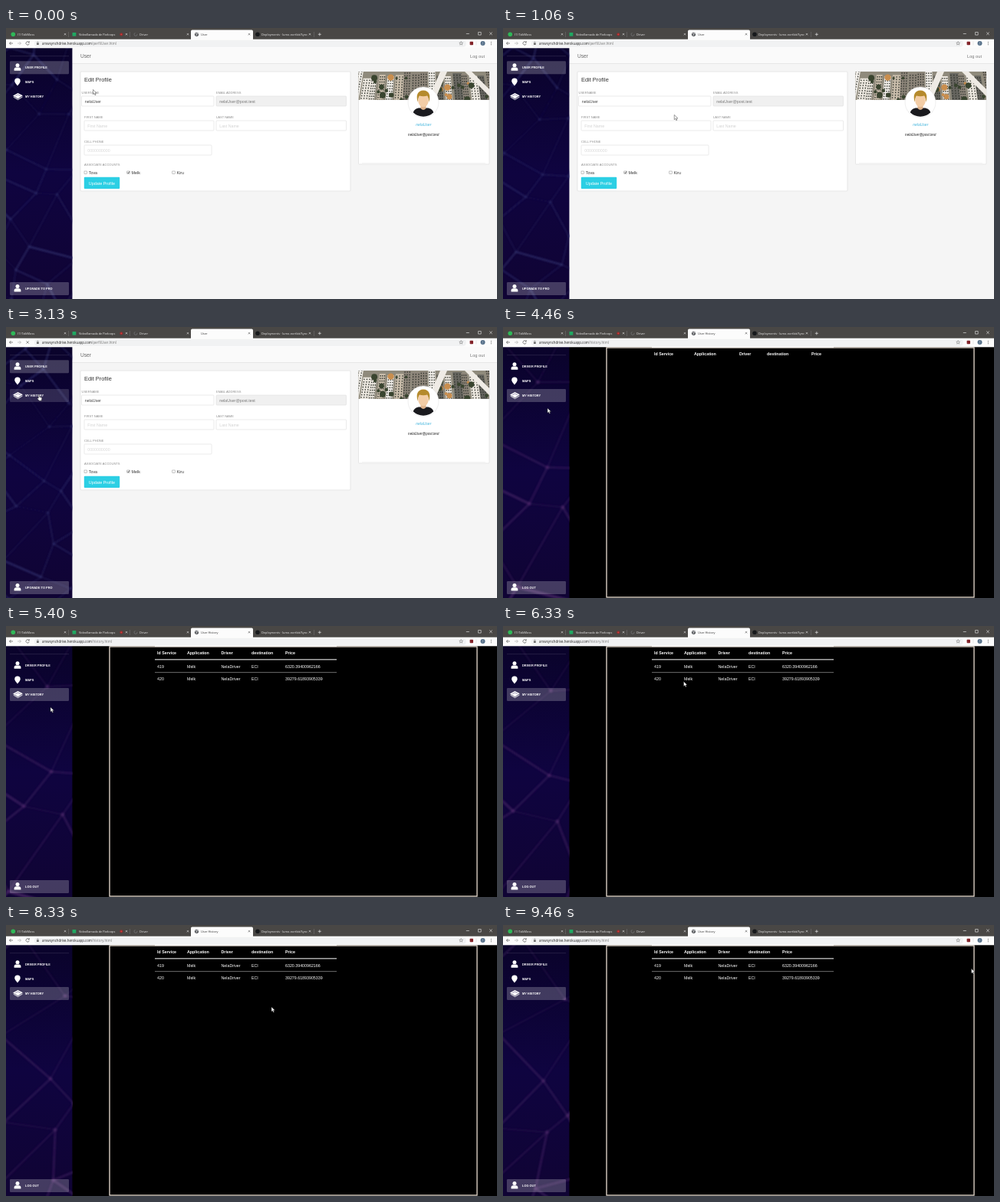
Animation of 640x354 px, one loop 9520 ms. Source, as an HTML page:

```html
<!DOCTYPE html>
<html lang="en">
<head>
<meta charset="utf-8">
<title>User</title>
<style>
html, body { margin: 0; width: 100%; height: 100%; overflow: hidden; background: #000; }
svg { display: block; width: 100%; height: 100%; }
text { font-family: "Liberation Sans", Arial, sans-serif; white-space: pre; }
.ui text { font-family: "Open Sans", "Noto Sans", sans-serif; }
.b { font-weight: bold; }
.i { font-style: italic; }
</style>
</head>
<body>
<svg id="stage" viewBox="0 0 640 354"></svg>
<script>
const LOOP = 9520, CLICK = 3060, LOAD = 4200, ROWS = 5330;
const SIDE = 86.4, TOP = 26;
const stage = document.getElementById('stage');

// Markup helpers
const text = (x, y, s, size, fill, cls = '', more = '') =>
  `<text x="${x}" y="${y}" font-size="${size}" fill="${fill}" class="${cls}" ${more}>${s}</text>`;
const rect = (x, y, w, h, fill, more = '') =>
  `<rect x="${x}" y="${y}" width="${w}" height="${h}" fill="${fill}" ${more}/>`;
const disc = (x, y, r, fill, more = '') => `<circle cx="${x}" cy="${y}" r="${r}" fill="${fill}" ${more}/>`;
const path = (d, stroke, w = 0.7, fill = 'none', more = '') =>
  `<path d="${d}" stroke="${stroke}" stroke-width="${w}" fill="${fill}" ${more}/>`;
const shape = (d, fill) => `<path d="${d}" fill="${fill}"/>`;
const group = (id, body, more = '') => `<g id="${id}" ${more}>${body}</g>`;
const cross = (x, y, r, c, w) => path(`M${x - r} ${y - r}l${2 * r} ${2 * r}m0 ${-2 * r}l${-2 * r} ${2 * r}`, c, w);
const range = n => [...Array(n).keys()];

function rng(seed) {
  return () => (seed = (seed * 16807) % 2147483647) / 2147483647;
}

function browser() {
  const tab = (x, s, fill = '#ececec', id = '') => text(x, 9.9, s, 3.9, fill, '', `id="${id}"`);
  const closes = [77, 157, 237, 396].map(x => cross(x, 8.2, 1.2, '#e0e0e0', 0.6)).join('');
  const seps = [81, 161.5, 401].map(x => rect(x, 5, 0.5, 7, '#777')).join('');
  return rect(0, 0, 640, 15, '#494745') + seps + closes +
    shape('M241 15V4.4q0-1.8 1.8-1.8h77.4q1.8 0 1.8 1.8V15z', '#fcfcfc') +
    cross(317, 8.2, 1.2, '#555', 0.6) +
    disc(9.3, 8.3, 2.8, '#2fb858') + tab(15, '(1) TalkMoss') +
    rect(86.5, 6, 4.8, 4.6, '#20a862') + tab(95, 'Videollamada de Parloops') +
    disc(150.3, 8.3, 2.1, '#8e2f2f') + disc(150.3, 8.3, 0.9, '#d94141') +
    disc(169, 8.3, 2, 'none', 'stroke="#77797c" stroke-width=".7" stroke-dasharray="8 3"') + tab(174, 'Driver') +
    group('globe', disc(248.5, 8.3, 2.6, '#56585c') + path('M246.6 7.2l1.6.2.5 1.4-1 1.4M249 6.2l.3 1 1.4.4', '#fafafa')) +
    tab(254, 'User', '#333', 'title') +
    disc(328, 8.3, 2.8, '#17191c') +
    `<g clip-path="url(#tabclip)">${tab(333, 'Deployments · lumo-nortbit/Sync')}</g>` +
    path('M406.8 8.3h4M408.8 6.3v4', '#e4e4e4') +
    path('M599.8 7.5h4M615.6 5.5h3.6v3.6h-3.6z', '#eee', 0.6) + cross(632, 7.3, 1.8, '#eee', 0.6) +
    rect(0, 14.7, 640, 11.6, '#fcfcfc') + rect(37, 15.7, 563, 9.3, '#f1f2f3', 'rx="4.6"') +
    path('M9 20H4.5m2-2l-2 2 2 2', '#555') + path('M15 20h4.5m-2-2l2 2-2 2', '#b4b4b4') +
    group('reload', path('M30 18.6a2.2 2.2 0 1 0 .3 2M30.3 17.2v1.8h-1.8', '#555')) +
    group('stop', cross(28.2, 20, 1.7, '#555', 0.7)) +
    rect(40, 19.6, 2.8, 2.3, '#666') + path('M40.6 19.6v-.8a.8.8 0 0 1 1.6 0v.8', '#666', 0.5) +
    `<text x="47" y="21.7" font-size="4.36" fill="#222">arswsynchdrive.herokuapp.com<tspan id="file" fill="#777"></tspan></text>` +
    path('M593.2 17.6l.7 1.6 1.7.1-1.3 1.1.4 1.7-1.5-.9-1.5.9.4-1.7-1.3-1.1 1.7-.1z', '#666', 0.5) +
    rect(604.6, 17.7, 4.4, 4.6, '#83242a', 'rx=".8"') + rect(612.8, 17.5, 0.4, 5, '#ccc') +
    disc(621.5, 20, 3, '#57718a') + text(620.7, 21.3, 'J', 3.4, '#fff') +
    range(3).map(k => disc(632.3, 18.2 + k * 1.8, 0.5, '#555')).join('');
}

// Sidebar
const person = y => disc(15, y - 2.2, 2.5, '#fff') + shape(`M10.6 ${y + 4.8}v-1.8q0-2.6 2.6-2.6h3.6q2.6 0 2.6 2.6v1.8z`, '#fff');
const item = (y, s, id = '') => text(25, y + 2, s, 3.92, '#fff', 'b', `id="${id}"`);
const plate = (y, id) => rect(5, y - 8.4, 77, 17, '#fff', `id="${id}" rx="1.2" opacity=".22"`);

function sidebar() {
  return rect(0, TOP, SIDE, 328, 'url(#night)') +
    '<g clip-path="url(#side)"><g id="web" filter="url(#soft)"></g></g>' +
    rect(5, 36.6, 77, 0.5, '#fff', 'opacity=".22"') +
    plate(51.6, 'plateUser') + plate(89.4, 'plateHistory') + plate(340.4, 'plateOut') +
    person(51) + item(51.4, '', 'who') +
    shape('M15 75.6q-3.7-4.2-3.7-6.3a3.7 3.7 0 0 1 7.4 0q0 2.1-3.7 6.3z', '#fff') + item(70.3, 'MAPS') +
    shape('M9 88.4l6.5-3.4 6.4 3.2-6.4 4.2z', '#fff') + path('M9.8 90.2l5.7 3.4 6-3.6', '#fff', 0.9) +
    path('M12.2 88.7l3.3-1.6 3.5 1.6', '#3a2a66', 0.5) + item(89.2, 'MY HISTORY') +
    person(339.8) + item(340.3, '', 'foot');
}

// Profile page
function photo() {
  const r = rng(37), tones = ['#ece7df', '#c9bdab', '#8c8479', '#d9c3a2', '#66655f', '#f4f1ec'];
  let s = rect(459, 57, 171, 37, '#8f8a7c');
  for (const k of range(17)) {
    const x = 455 + k * 10.6, y = 54 + r() * 12, w = 7 + r() * 5, lean = (k - 8) * 0.9;
    s += shape(`M${x} ${y}h${w}l${lean} 42h${-w}z`, tones[Math.floor(r() * tones.length)]);
    for (const j of range(3))
      s += path(`M${x + 1.5 + j * w / 3} ${y + 2}l${lean} 38`, '#33362f', 1.3, 'none', 'stroke-dasharray="1.6 1.8"');
  }
  for (const k of range(26))
    s += disc(460 + r() * 168, 60 + r() * 34, 1.5 + r() * 2.8, k % 5 ? '#39442f' : '#c98e4e');
  s += shape('M566 57h9l-16 37h-9zM598 57h9l25 25v9z', '#efebe5');
  return `<g clip-path="url(#shot)">${s}</g>`;
}

function avatar() {
  return disc(544, 97, 20, '#fff', 'stroke="#ddd" stroke-width=".5"') +
    '<g clip-path="url(#face)">' +
    shape('M529.5 117q0-11 8-12.5h13q8 1.500 8 12.500z', '#1a1a1e') +
    shape('M540.5 100h7v5q-3.500 4-7 0z', '#e0b48c') +
    '<ellipse cx="544" cy="94.500" rx="6.800" ry="8.800" fill="#f3cda6"/>' +
    shape('M536.5 97q-3.500-15 7.500-15.500 11 .5 7.500 15.500-.5-6-2.500-8.500-5 1.500-10 0-2 2.500-2.500 8.500z', '#b58a2c') + '</g>';
}

function profile() {
  const label = (x, y, s) => text(x, y, s, 4.05, '#8d8d8d');
  const card = (x, y, w, h) => rect(x, y, w, h, '#fff', 'stroke="#dedede" stroke-width=".7" rx="1"');
  const field = (x, y, w, name, value, ink, bg = '#fff') => label(x, y - 3.5, name) +
    rect(x, y, w, 13, bg, 'stroke="#dedede" stroke-width=".6" rx="1"') + text(x + 4.2, y + 8.5, value, 5.3, ink);
  const check = (x, s, on) => rect(x, 187, 3.4, 3.4, '#fff', 'stroke="#8a8a8a" stroke-width=".5"') +
    (on ? path(`M${x + 0.6} 188.700l1 1.100 1.500-2.300`, '#222', 0.8) : '') + text(x + 5.8, 190.9, s, 5.3, '#333');
  const centred = (y, s, size, ink) => text(544.3, y, s, size, ink, 'i', 'text-anchor="middle"');
  return rect(86, TOP, 554, 328, '#f5f5f5') + rect(86, TOP, 554, 20, '#fafafa') + rect(86, 46, 554, 0.6, '#dcdcdc') +
    text(97, 38.7, 'User', 6.6, '#666') + text(605, 38.5, 'Log out', 5.7, '#777') +
    card(97, 57, 352, 156) + text(102, 70, 'Edit Profile', 7.4, '#333') +
    field(98.5, 89, 172.5, 'USERNAME', 'nelaUser', '#444') +
    field(274, 89, 169.5, 'EMAIL ADDRESS', 'nelaUser@post.test', '#777', '#f0f0f0') +
    field(102, 121, 169, 'FIRST NAME', 'First Name', '#d2d2d2') +
    field(274, 121, 169.5, 'LAST NAME', 'Last Name', '#d2d2d2') +
    field(102, 153, 166, 'CELL PHONE', '0000000000', '#d8d8d8') +
    label(102, 179.6, 'ASSOCIATE ACCOUNTS') +
    check(102, 'Tova') + check(157.8, 'Melk', true) + check(216.8, 'Kiru') +
    rect(101.8, 194.8, 46.4, 15.2, '#2ccfe4', 'rx="1"') + text(107.8, 204.6, 'Update Profile', 5.4, '#fff') +
    card(459.5, 57, 170.5, 121) + photo() + avatar() +
    centred(128.3, 'nelaUser', 5, '#41b4dc') + centred(140.8, 'nelaUser@post.test', 4.6, '#222') +
    rect(464, 176, 161, 0.5, '#e6e6e6');
}

// History page
function history() {
  const row = (xs, y, cells, cls = '') => cells.map((s, k) => text(xs[k], y, s, 5.3, '#fff', cls)).join('');
  const heads = ['Id Service', 'Application', 'Driver', 'destination', 'Price'];
  const wide = [197, 249, 308, 344, 402], full = [197, 236, 280.5, 320, 364];
  return rect(86, TOP, 554, 328, '#000') +
    rect(135, 27, 479, 326, 'none', 'stroke="#eaded2" stroke-width="1.3"') +
    rect(194, 26.3, 237, 0.8, '#fff') +
    group('empty', row(wide, 37.4, heads, 'b')) +
    group('rows', row(full, 37.4, heads, 'b') + rect(194, 43.3, 237, 1.1, '#e8e8e8') +
      row(full, 54.6, ['419', 'Melk', 'NelaDriver', 'ECI', '6320.39400962166']) +
      rect(194, 60.4, 237, 0.7, '#9a9a9a') +
      row(full, 71.1, ['420', 'Melk', 'NelaDriver', 'ECI', '39279.61893905339']));
}

const clip = (id, body) => `<clipPath id="${id}">${body}</clipPath>`;
stage.innerHTML = `<defs>
  <linearGradient id="night" x1="0" y1="0" x2="0" y2="1">
    <stop offset="0" stop-color="#0a032b"/><stop offset=".5" stop-color="#0f0440"/><stop offset="1" stop-color="#100434"/>
  </linearGradient>
  <filter id="soft" filterUnits="userSpaceOnUse" x="-20" y="0" width="130" height="380"><feGaussianBlur stdDeviation="1.1"/></filter>` +
  clip('side', rect(0, TOP, SIDE, 328, '#000')) + clip('shot', rect(459.5, 57, 170.5, 37, '#000')) +
  clip('face', disc(544, 97, 18.8, '#000')) + clip('tabclip', rect(333, 0, 60, 15, '#000')) + '</defs>' +
  group('profile', profile()) + group('history', history()) + sidebar() + group('chrome', browser(), 'class="ui"') +
  group('arrow', path('M0 0v6.2l1.5-1.3 1 2.3 1.1-.5-1-2.2h2z', '#222', 0.45, '#fff')) +
  group('hand', path('M-.7 4V.5q.7-1 1.4 0v2.4l2.5.6q.8.3.6 1.2L3.2 7.8H.2L-2.2 5q.3-1 1.5-.3z', '#222', 0.45, '#fff'));

const el = {};
stage.querySelectorAll('[id]').forEach(n => { el[n.id] = n; });
const show = (id, on) => { el[id].style.display = on ? '' : 'none'; };

// Pointer stops: time, x, y
const stops = [
  [0, 113.5, 80.5], [950, 232, 110], [1900, 0.3, 202], [2200, 0.3, 202], [2950, 43, 88.5], [3700, 43, 88.5],
  [4400, 58, 106], [5400, 58, 106], [6330, 235.5, 72.5], [7000, 405, 85], [8330, 346, 107], [9460, 610.5, 57]
];
function pointer(t) {
  const n = stops.findIndex(s => s[0] > t);
  if (n < 0) return stops[stops.length - 1].slice(1);
  const [t0, x0, y0] = stops[n - 1], [t1, x1, y1] = stops[n];
  const u = (t - t0) / (t1 - t0), e = u * u * (3 - 2 * u);
  return [x0 + (x1 - x0) * e, y0 + (y1 - y0) * e];
}

// A jittered lattice that turns and drifts behind the menu
const COLS = 7, LINES = 10, rand = rng(91);
const nodes = range(COLS * LINES).map(k => ({
  x: (k % COLS - 3 + (rand() - 0.5) * 0.7) * 38,
  y: (Math.floor(k / COLS) - 4.5 + (rand() - 0.5) * 0.7) * 46,
  phase: rand() * 6.28
}));
const edges = nodes.flatMap((_, k) => [
  ...(k % COLS < COLS - 1 ? [[k, k + 1]] : []),
  ...(k + COLS < nodes.length ? [[k, k + COLS]] : [])
]).map(([a, b]) => ({ a, b, glow: 0.25 + 0.75 * rand() }));

function drawWeb(t) {
  const near = t >= LOAD, age = (near ? t - LOAD : t) / 1000;
  const zoom = near ? 1.7 : 1.1, ink = near ? '#4b2868' : '#30306c';
  const turn = 0.5 + age * 0.07, c = Math.cos(turn) * zoom, s = Math.sin(turn) * zoom;
  const at = nodes.map(({ x, y, phase }) => {
    const px = x + 5 * Math.sin(age * 0.6 + phase), py = y + 5 * Math.cos(age * 0.6 + phase);
    return [43 + px * c - py * s - age * 4, 190 + px * s + py * c + age * 5];
  });
  el.web.innerHTML = edges.map(({ a, b, glow }) =>
    path(`M${at[a]}L${at[b]}`, ink, (0.8 + glow * 1.6) * zoom, 'none', `opacity="${glow * 0.75}"`)).join('') +
    at.map(([x, y]) => disc(x, y, 1.4 * zoom, ink, 'opacity=".7"')).join('');
}

function draw(t) {
  const old = t < LOAD, loading = t >= CLICK && old;
  const [x, y] = pointer(t);
  const hover = old && x < 82 && y > 81 && y < 98;
  show('profile', old);
  show('history', !old);
  show('empty', t < ROWS);
  show('rows', t >= ROWS);
  show('globe', !loading);
  show('reload', !loading);
  show('stop', loading);
  show('plateUser', old);
  show('plateHistory', !old || hover);
  show('arrow', !hover);
  show('hand', hover);
  el.plateHistory.setAttribute('opacity', old ? 0.15 : 0.22);
  el.title.textContent = old ? 'User' : 'User History';
  el.file.textContent = old ? '/perfilUser.html' : '/history.html';
  el.who.textContent = old ? 'USER PROFILE' : 'DRIVER PROFILE';
  el.foot.textContent = old ? 'UPGRADE TO PRO' : 'LOG OUT';
  el[hover ? 'hand' : 'arrow'].setAttribute('transform', `translate(${x} ${y})`);
  drawWeb(t);
}

const start = performance.now();
function tick() {
  draw((performance.now() - start) % LOOP);
  requestAnimationFrame(tick);
}
tick();
</script>
</body>
</html>
```
